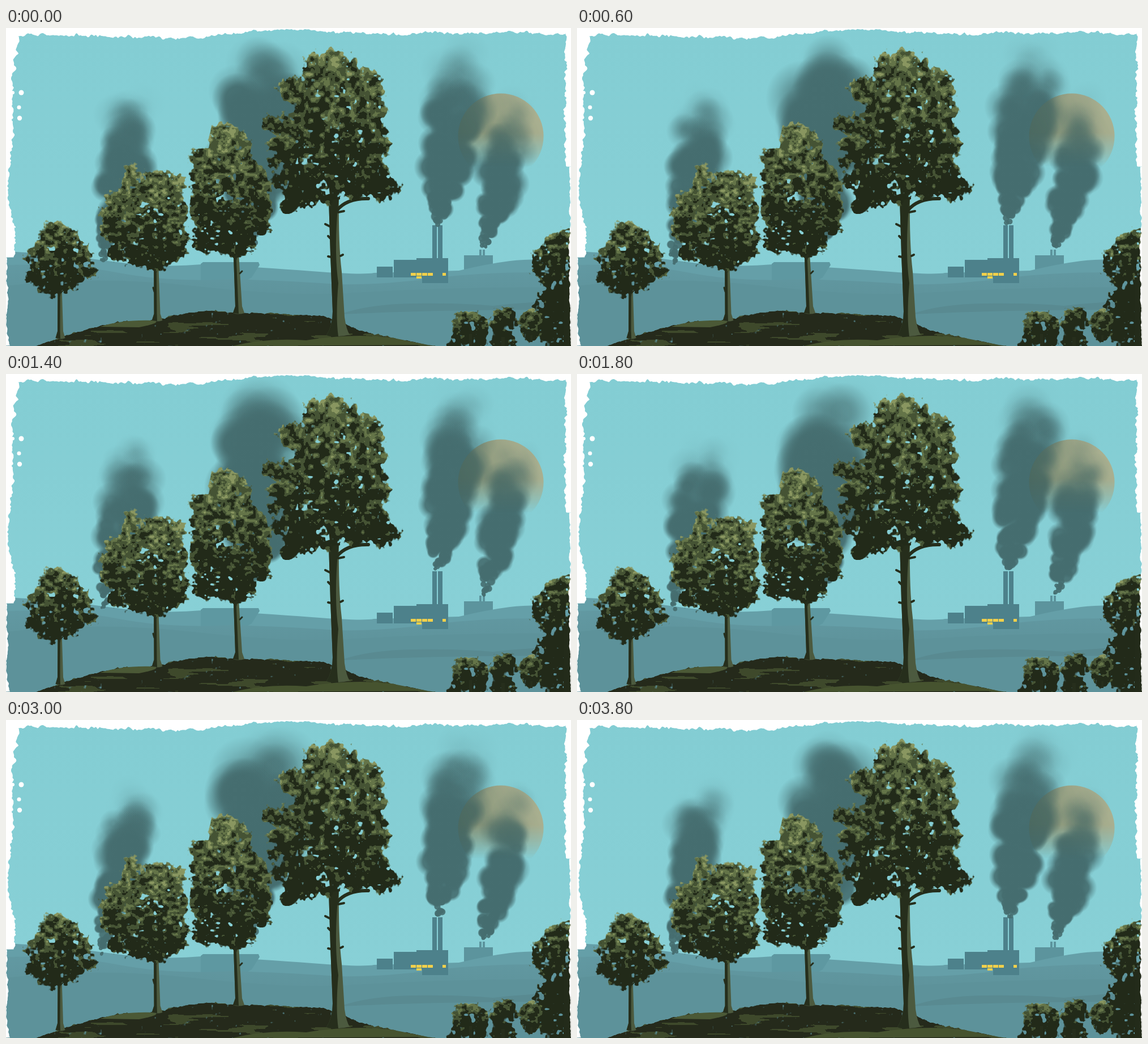
These frames come from a looping animation (998x561 px, 4 s). An HTML page with a canvas:

```html
<!DOCTYPE html>
<html lang="en">
<head>
<meta charset="utf-8">
<title>Smoke over the hills</title>
<style>
html, body { margin: 0; width: 100%; height: 100%; overflow: hidden; background: #85ced4; }
canvas { display: block; }
</style>
</head>
<body>
<canvas id="stage" width="998" height="561"></canvas>
<script>
const W = 998, H = 561, LOOP = 4000, STEP = 200;
const stage = document.getElementById('stage').getContext('2d');

function layer() {
  const c = document.createElement('canvas');
  c.width = W; c.height = H;
  return c.getContext('2d', { willReadFrequently: true });
}
const clamp = v => Math.max(0, Math.min(1, v));
const mix = (a, b, k) => a + (b - a) * k;

// Value noise
function hash(x, y = 0) {
  const s = Math.sin(x * 127.1 + y * 311.7) * 43758.5453;
  return s - Math.floor(s);
}
function noise(x, y) {
  const i = Math.floor(x), j = Math.floor(y);
  const ease = k => k * k * (3 - 2 * k);
  const u = ease(x - i), v = ease(y - j);
  return mix(mix(hash(i, j), hash(i + 1, j), u), mix(hash(i, j + 1), hash(i + 1, j + 1), u), v);
}
const rough = (x, y) => noise(x, y) * .65 + noise(x * 2.1 + 9, y * 2.1 + 5) * .35;

function fill(c, color, path) {
  c.fillStyle = color;
  c.fill(new Path2D(path));
}
function box(c, color, ...rects) {
  c.fillStyle = color;
  for (const r of rects) c.fillRect(...r);
}

const LEAF = [[.86, [137, 150, 96]], [.52, [100, 116, 72]], [.14, [69, 83, 52]], [-9, [34, 42, 25]]];
const SOIL = [[.24, [62, 73, 43]], [-9, [37, 42, 27]]];

// Fills an outline with ragged, posterised tones that darken downwards.
function texture(target, path, top, bottom, o = {}) {
  const { bias = .1, slope = 1.1, blur = 4.5, sx = 8, sy = 7, holes = .24, tones = LEAF } = o;
  const c = layer();
  c.filter = `blur(${blur}px)`;
  c.fill(new Path2D(path));
  const img = c.getImageData(0, 0, W, H), d = img.data;
  for (let y = 0, p = 0; y < H; y++) for (let x = 0; x < W; x++, p += 4) {
    const a = d[p + 3] / 255;
    if (a < .04) { d[p + 3] = 0; continue; }
    const u = clamp((y - top) / (bottom - top));
    const edge = a - .5 + (rough(x / 7 + 40, y / 7) - .5) * 1.25;
    const gap = rough(x / 11 + 80, y / 10) - holes * (.72 + .42 * u) - (1 - a) * .1;
    const v = bias + slope * (.5 - u) + (rough(x / sx, y / sy) - .5) * 1.9 + (1 - a) * .55;
    const rgb = tones.find(t => v > t[0])[1];
    for (let k = 0; k < 3; k++) d[p + k] = rgb[k];
    d[p + 3] = 255 * clamp(edge * 5 + .5) * (holes ? clamp(gap * 16 + .5) : 1);
  }
  c.putImageData(img, 0, 0);
  target.drawImage(c.canvas, 0, 0);
}

function trunk(c, x0, y0, w0, x1, y1, w1) {
  const foot = y1 - 12;
  fill(c, '#4c5a3f', `M${x0 - w0} ${y0} L${x1 - w1} ${foot} L${x1 - w1 * 1.7} ${y1} Q${x1} ${y1 + 3} ${x1 + w1 * 1.7} ${y1} L${x1 + w1} ${foot} L${x0 + w0} ${y0}Z`);
  fill(c, '#262e1c', `M${x0 - w0} ${y0} L${x1 - w1} ${foot} L${x1 - w1 * 1.7} ${y1} L${x1} ${y1 + 1} L${x1 - w1 * .1} ${foot} L${x0 + w0 * .2} ${y0 + 20} L${x0 + w0} ${y0}Z`);
}
function twigs(c, width, path) {
  c.strokeStyle = '#262e1c';
  c.lineWidth = width;
  c.lineCap = 'round';
  c.stroke(new Path2D(path));
}

function drawBack() {
  const c = layer();
  const sky = c.createLinearGradient(0, 0, 0, 430);
  sky.addColorStop(0, '#83cdd3');
  sky.addColorStop(1, '#88d0d6');
  c.fillStyle = sky;
  c.fillRect(0, 0, W, H);
  return c.canvas;
}

function drawLand() {
  const c = layer();
  box(c, '#5c949d', [809, 401, 51, 30], [836, 391, 4, 12], [842, 391, 4, 12]);
  fill(c, '#659fa8', 'M0 394 Q90 398 180 411 T345 417 Q450 422 540 429 T650 432 L800 428 Q850 416 890 411 T998 410 V561 H0Z');
  fill(c, '#5e98a1', 'M344 416 L348 413 H446 L448 418 L434 440 L420 448 H344Z');
  const low = c.createLinearGradient(0, 415, 0, 561);
  low.addColorStop(0, '#6299a2');
  low.addColorStop(1, '#598b92');
  fill(c, low, 'M0 418 Q110 415 200 432 T400 443 Q500 446 570 451 T760 441 Q860 428 998 432 V561 H0Z');
  fill(c, '#5d929a', 'M0 455 Q160 436 330 455 T600 468 Q800 455 998 458 V561 H0Z');
  fill(c, '#598a91', 'M590 505 Q640 487 720 486 T860 490 Q930 482 998 482 V497 Q780 496 590 505Z');
  box(c, '#4d818b', [655, 421, 28, 19], [685, 409, 96, 31], [725, 406, 56, 4], [735, 438, 46, 12], [753, 348, 8, 60], [763, 348, 8, 60]);
  box(c, '#f1d04b', [715, 432, 9, 5], [725, 432, 9, 5], [735, 432, 9, 5], [745, 432, 9, 5], [725, 438, 9, 4], [771, 432, 6, 5]);
  return c.canvas;
}

function drawFront() {
  const c = layer();
  texture(c, 'M45 563 C100 545 150 526 205 518 L270 515 Q315 499 365 499 L410 503 L480 504 L560 508 Q590 515 620 532 Q680 547 765 563 V590 H45Z',
    490, 561, { bias: 0, slope: .1, blur: 1, sx: 62, sy: 6, holes: 0, tones: SOIL });
  fill(c, '#4b5936', 'M166 527 Q205 514 262 516 Q276 520 235 528Z');
  fill(c, '#46532f', 'M400 561 Q460 546 530 551 Q610 538 680 546 L745 559Z');

  trunk(c, 95, 455, 3.5, 96, 547, 5);
  twigs(c, 2, 'M94 470 L62 445 M96 468 L125 440 M95 460 L94 420');
  texture(c, 'M82 338 L105 352 L123 357 L130 375 L146 380 L150 402 L162 420 L158 438 L140 445 L128 458 L104 464 L86 473 L62 468 L50 452 L33 450 L40 418 L30 408 L38 392 L52 380 L58 360Z',
    338, 470, { bias: .02, slope: 1.1, blur: 4 });

  trunk(c, 265, 410, 4, 267, 516, 5.5);
  twigs(c, 3, 'M265 430 L225 395 M266 425 L300 395 M262 465 L260 458 M264 420 L262 360');
  texture(c, 'M222 236 L235 256 L270 253 L306 257 L318 276 L312 300 L326 322 L314 350 L326 372 L320 403 L299 410 L284 425 L262 429 L226 418 L190 411 L178 398 L184 382 L164 357 L170 335 L164 322 L178 312 L172 296 L204 285 L208 250Z',
    236, 430, { bias: .17, slope: 1.35 });

  trunk(c, 406, 390, 4.5, 411, 503, 6);
  twigs(c, 3, 'M406 408 L372 375 M407 405 L440 372 M413 433 L417 429 M405 395 L402 340');
  texture(c, 'M381 164 L412 178 L429 192 L440 235 L457 250 L469 277 L465 300 L471 325 L462 340 L474 358 L440 373 L438 388 L418 403 L393 405 L370 394 L350 399 L328 385 L335 350 L321 325 L329 280 L321 257 L334 245 L324 230 L335 213 L356 210 L364 178Z',
    164, 405, { bias: .1, slope: 1.15 });

  fill(c, '#4c5a3f', 'M570 300 L588 300 Q587 380 593 430 L598 510 Q601 532 607 541 Q585 547 566 542 Q577 525 577 500 L573 400Z');
  fill(c, '#262e1c', 'M570 300 L588 300 L585 330 Q580 400 587 450 Q582 510 587 544 Q573 545 566 542 Q577 525 577 500 L573 400Z');
  twigs(c, 4, 'M572 350 L564 346 M573 371 L569 367 M574 404 L569 403 M587 325 L597 323 M591 402 L595 400');
  twigs(c, 6, 'M584 322 Q602 300 640 301 M577 312 L570 250 M580 305 L602 225');
  texture(c, 'M540 38 L555 48 L575 34 L592 44 L606 62 L615 43 L621 58 L617 76 L635 70 L665 84 L666 130 L679 150 L660 161 L675 178 L668 195 L683 208 L674 225 L655 232 L676 247 L682 265 L700 275 L691 293 L665 306 L640 296 L615 306 L595 292 L575 313 L555 305 L540 318 L515 319 L495 332 L481 318 L491 298 L470 271 L475 255 L459 240 L478 222 L459 212 L462 200 L480 190 L452 181 L455 156 L500 150 L513 139 L485 121 L479 104 L500 84 L532 97 L522 74 L527 58Z',
    36, 330, { bias: .03, slope: .95, blur: 4.5, sx: 9, sy: 9, holes: .22 });

  const shade = { bias: -.12, slope: .9, blur: 4, holes: .27 };
  texture(c, 'M985 354 L1010 356 V580 H965 L945 548 L932 520 L940 498 L928 488 L946 465 L950 445 L928 428 L930 398 L946 385 L957 365Z', 350, 480, shade);
  box(c, '#232b1a', [985, 440, 13, 121]);
  const bush = { ...shade, blur: 3, holes: .23 };
  texture(c, 'M800 502 L830 499 L850 512 L853 532 L846 550 L860 575 H768 L790 538 L787 515Z', 497, 545, bush);
  texture(c, 'M865 497 L884 490 L901 500 L902 522 L895 540 L900 557 L878 575 L855 557 L860 540 L853 520Z', 490, 545, bush);
  texture(c, 'M915 501 L930 497 L946 508 L946 532 L937 551 L921 554 L909 542 L912 528 L906 513Z', 495, 550, bush);
  box(c, '#262e1c', [818, 540, 5, 21], [875, 545, 6, 16], [926, 542, 4, 12]);
  drawBorder(c);
  return c.canvas;
}

// Torn white paper edges; depths are evenly spaced along each side.
function drawBorder(c) {
  const depth = (list, k) => {
    const p = k * (list.length - 1), i = Math.min(list.length - 2, Math.floor(p));
    return mix(list[i], list[i + 1], p - i);
  };
  const torn = (list, length, place, seed) => {
    c.beginPath();
    c.moveTo(...place(0, -9));
    for (let s = 0; s <= length; s += 1.5) {
      const base = depth(list, s / length);
      const n = (rough(s / 9, seed) - .5) * 8 + (noise(s / 3, seed + 7) - .5) * 3;
      c.lineTo(...place(s, base + n * Math.min(1, .3 + base / 12)));
    }
    c.lineTo(...place(length, -9));
    c.fill();
  };
  c.fillStyle = '#fff';
  torn([18, 12, 12, 14, 14, 15, 18, 17, 9, 5, 2, 4, 9, 11, 11, 8, 10, 8, 6, 10, 12], W, (s, d) => [s, d], 3);
  torn([21, 19, 13, 11, 12, 12, 7, 3, 5, 16], 353, (s, d) => [d, s], 21);
  torn([16, 17, 15], 53, (s, d) => [d, s + 352], 33);
  torn([3, 2, 3, 1, 6], 157, (s, d) => [d, s + 404], 45);
  torn([11, 10, 9, 11, 11, 10, 9], 245, (s, d) => [W - d, s], 57);
  torn([3, 2, 3, 2, 0], 316, (s, d) => [W - d, s + 245], 69);
  for (const [x, y, r] of [[27, 114, 4.5], [12, 114, 3], [23, 140, 3.5], [24, 159, 4.2]]) {
    c.beginPath();
    c.arc(x, y, r, 0, 7);
    c.fill();
  }
}

function drawMoon(c, alpha, left, right) {
  const m = layer();
  const g = m.createLinearGradient(800, 220, 945, 150);
  g.addColorStop(0, left);
  g.addColorStop(1, right);
  m.fillStyle = g;
  m.beginPath();
  m.arc(874, 191, 75.5, 0, 7);
  m.fill();
  const fade = m.createLinearGradient(0, 185, 0, 245);
  fade.addColorStop(0, '#000');
  fade.addColorStop(1, '#0000');
  m.globalCompositeOperation = 'destination-in';
  m.fillStyle = fade;
  m.fillRect(0, 0, W, H);
  c.globalAlpha = alpha;
  c.drawImage(m.canvas, 0, 0);
  c.globalAlpha = 1;
}

// Each plume follows a spine of [x, y, half-width].
const plumes = [
  { seed: 11, count: 90, soft: .85, spine: [[171, 412, 7], [176, 360, 22], [195, 300, 42], [210, 240, 54], [218, 185, 52], [222, 135, 50]] },
  { seed: 37, count: 64, soft: .65, spine: [[434, 378, 9], [440, 315, 44], [444, 235, 80], [448, 165, 94], [452, 115, 88], [454, 95, 84]] },
  { seed: 59, count: 110, soft: .8, spine: [[763, 344, 8], [770, 298, 30], [779, 240, 46], [786, 180, 52], [802, 115, 60], [812, 62, 60]] },
  { seed: 83, count: 90, soft: .8, spine: [[845, 386, 7], [854, 345, 25], [867, 300, 39], [878, 250, 44], [888, 198, 47], [898, 130, 46]] },
];

function puff(c, x, y, r, solid, alpha) {
  const g = c.createRadialGradient(x, y, 0, x, y, r);
  const tint = a => `rgba(69,109,111,${a})`;
  g.addColorStop(0, tint(alpha));
  g.addColorStop(solid, tint(alpha));
  g.addColorStop(mix(solid, 1, .5), tint(alpha * .45));
  g.addColorStop(1, tint(0));
  c.fillStyle = g;
  c.fillRect(x - r, y - r, r * 2, r * 2);
}

function drawPlume(c, { seed, count, soft, spine }, t) {
  for (let i = 0; i < count; i++) {
    const life = t / LOOP * 2 + i / count;
    const age = life % 1, id = seed + i * 3.7 + (Math.floor(life) % 2) * 517;
    const p = age * (spine.length - 1), k = Math.floor(p);
    const [x, y, w] = spine[k].map((v, n) => mix(v, spine[k + 1][n], p - k));
    const angle = hash(id, 1) * 6.283 + age * 1.5;
    const off = w * .64 * Math.sqrt(hash(id, 2));
    const r = w * mix(.36, .62, hash(id, 3)) * (1 + age * .3);
    const alpha = .9 * Math.pow(clamp((1 - age) / .36), 1.5);
    puff(c, x + Math.cos(angle) * off, y + Math.sin(angle) * off, r, clamp(.85 - age * soft), alpha);
  }
}

const back = drawBack(), land = drawLand(), front = drawFront();
drawMoon(back.getContext('2d'), .92, '#82957f', '#b3b596');
const glow = layer();
drawMoon(glow, .2, '#5d5425', '#a5a070');

let shown = -1;
function frame() {
  const step = Math.floor(performance.now() % LOOP / STEP);
  if (step !== shown) {
    shown = step;
    stage.drawImage(back, 0, 0);
    stage.drawImage(land, 0, 0);
    for (const p of plumes) drawPlume(stage, p, step * STEP);
    stage.drawImage(glow.canvas, 0, 0);
    stage.drawImage(front, 0, 0);
  }
  requestAnimationFrame(frame);
}
frame();
</script>
</body>
</html>
```
